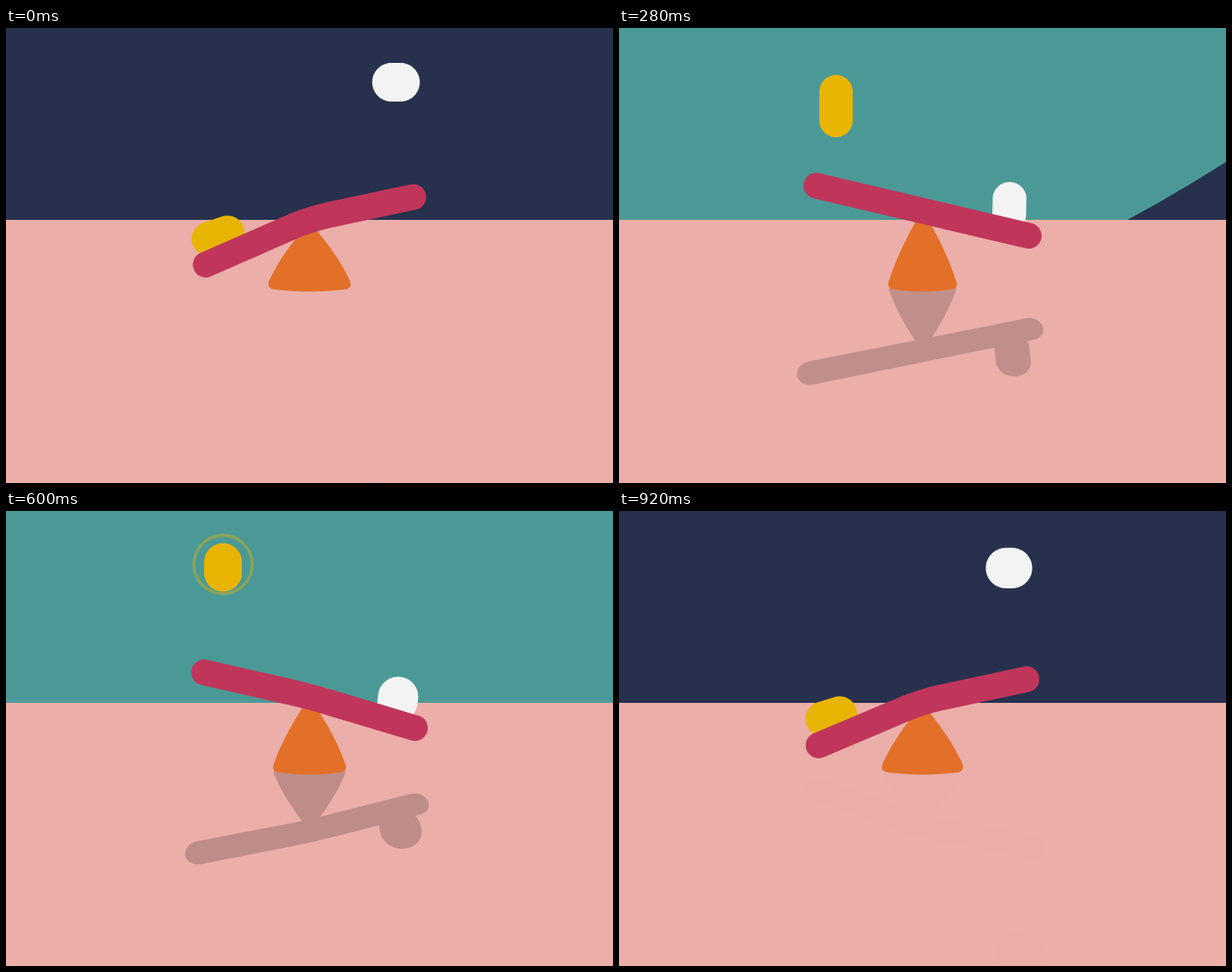
Recreate the animation shown at these times as an HTML page with a canvas. Size 800 by 600 pixels, loop 960 ms.

```html
<!DOCTYPE html>
<html lang="en">
<head>
<meta charset="utf-8">
<title>Seesaw</title>
<style>
  html, body { margin: 0; width: 100%; height: 100%; overflow: hidden; background: #ebaea9; }
  canvas { display: block; width: 800px; height: 600px; }
</style>
</head>
<body>
<canvas id="stage" width="800" height="600"></canvas>
<script>
const ctx = document.getElementById('stage').getContext('2d');
const LOOP = 960, STEP = 40, HORIZON = 253;
const NAVY = '#27314d', TEAL = '#4b9996', YELLOW = '#e8b404', WHITE = '#f3f3f3';
const PINK = [235, 174, 169];

const clamp = (v, lo = 0, hi = 1) => Math.min(hi, Math.max(lo, v));
const mix = (a, b, k) => a + (b - a) * k;
const mixAll = (a, b, k) => a.map((v, i) => mix(v, b[i], k));
const rad = deg => deg * Math.PI / 180;
const quadInOut = x => x < 0.5 ? 2 * x * x : 1 - 2 * (1 - x) ** 2;
const rgb = c => `rgb(${c.map(Math.round).join()})`;

function fillShape(points, color) {
  ctx.fillStyle = color;
  ctx.beginPath();
  points.forEach(([x, y]) => ctx.lineTo(x, y));
  ctx.fill();
}

// Points of a quadratic curve
function curve(a, c, b, n = 16) {
  return Array.from({ length: n + 1 }, (_, i) => mixAll(mixAll(a, c, i / n), mixAll(c, b, i / n), i / n));
}

// Rounded box with fully round short sides, turned about its centre
function pill([cx, cy, w, h, deg]) {
  const r = Math.min(w, h) / 2, cos = Math.cos(rad(deg)), sin = Math.sin(rad(deg)), n = 96;
  return Array.from({ length: n }, (_, i) => {
    const a = (i + 0.5) / n * 2 * Math.PI;
    const x = Math.sign(Math.cos(a)) * (w / 2 - r) + r * Math.cos(a);
    const y = Math.sign(Math.sin(a)) * (h / 2 - r) + r * Math.sin(a);
    return [cx + x * cos - y * sin, cy + x * sin + y * cos];
  });
}

// Thick line with round ends
function thickLine(line, r) {
  const heading = i => {
    const a = line[Math.max(0, i - 1)], b = line[Math.min(line.length - 1, i + 1)];
    return Math.atan2(b[1] - a[1], b[0] - a[0]);
  };
  const at = ([x, y], a) => [x + r * Math.cos(a), y + r * Math.sin(a)];
  const cap = (p, from) => Array.from({ length: 21 }, (_, i) => at(p, from + Math.PI * i / 20));
  const last = line.length - 1;
  const upper = line.map((p, i) => at(p, heading(i) - Math.PI / 2));
  const lower = line.map((p, i) => at(p, heading(i) + Math.PI / 2)).reverse();
  return [...upper, ...cap(line[last], heading(last) - Math.PI / 2),
          ...lower, ...cap(line[0], heading(0) + Math.PI / 2)];
}

function plank(tilt, side, squash) {
  const angle = rad(13.27) * tilt;
  const pivot = [400, 241 + 11 * squash];
  const end = dir => {
    const low = dir === side;
    return [400 + dir * (143.8 * Math.cos(angle) - 3.2 * squash),
            241 + dir * 143.8 * Math.sin(angle) + (low ? 38 : 15) * squash];
  };
  const a = end(-1), b = end(1);
  return thickLine([a, ...curve(mixAll(pivot, a, 0.2), pivot, mixAll(pivot, b, 0.2)), b], 17);
}

function stand(squash) {
  const hw = 46 + 9 * squash;
  const half = dir => {
    const p = (x, y) => [400 + dir * x, y];
    return [
      ...curve(p(7, 252 + 12 * squash), p(32 + 7 * squash, 295 + 7 * squash), p(hw - 2, 333)),
      ...curve(p(hw - 2, 333), p(hw + 2, 342), p(hw - 7, 344.5)),
      ...curve(p(hw - 7, 344.5), p((hw - 7) / 2, 347.5), p(0, 347.5))
    ];
  };
  return [...half(-1), ...half(1).reverse()];
}

// Mirror onto the floor, seen in perspective
function cast(points) {
  return points.map(([x, y]) => {
    const depth = 1 - 0.00055 * (300 - y);
    return [400 + (x - 400) / depth, 375 + 0.824 * (300 - y) / depth];
  });
}

const mirror = ([x, y, w, h, deg]) => [800 - x, y, w, h, -deg];

// Poses are [x, y, width, height, degrees] on the left half of the stage
function seatedPose(squash, hold) {
  const pose = mixAll([285.5, 236, 44.5, 66, -1.4], [279.5, 274, 71, 45, -18.5], squash);
  return mixAll([286, 172, 44, 80, 0], pose, hold);
}

function flyingPose(u, squash, hold) {
  const x = clamp(u, -200, 200) / 40;
  const y = 71.5 - 2.674 * x + 1.1315 * x ** 2 + 0.049 * x ** 3 - 0.00646 * x ** 4;
  const h = 51 + (u < 0 ? 31 : 19) * (1 - squash);
  return mixAll([286, 172, 44, 80, 0], [286, y, 44 + 18.75 * squash, h, 0], hold);
}

// The next sky swings in as a huge disc turning about the pivot
function drawSky(t) {
  const turn = Math.floor(t / 480);
  const [from, to] = turn ? [TEAL, NAVY] : [NAVY, TEAL];
  const k = clamp((t % 480 - 200) / 80, -0.184, 1.16);
  const angle = rad(mix(-65.4, 68.4, k)), R = 2100;
  const offset = mix(-12.6, 114.5, k) - R;
  ctx.save();
  ctx.beginPath();
  ctx.rect(0, 0, 800, HORIZON);
  ctx.clip();
  ctx.fillStyle = from;
  ctx.fillRect(0, 0, 800, HORIZON);
  ctx.fillStyle = to;
  ctx.beginPath();
  ctx.arc(400 + Math.cos(angle) * offset, HORIZON + Math.sin(angle) * offset, R, 0, 2 * Math.PI);
  ctx.fill();
  ctx.restore();
}

function drawRing(t) {
  const k = (t - 520) / 170;
  if (k <= 0 || k >= 1) return;
  ctx.globalAlpha = 0.1 + 0.6 * (1 - k);
  ctx.strokeStyle = YELLOW;
  ctx.lineWidth = 0.6 + 6 * (1 - k);
  ctx.beginPath();
  ctx.arc(286, 70.5, 53.5 * (1 - (1 - k) ** 2), 0, 2 * Math.PI);
  ctx.stroke();
  ctx.globalAlpha = 1;
}

function draw(t) {
  const u = (t + 240) % 480 - 240;
  const side = t >= 240 && t < 720 ? 1 : -1;
  const squash = quadInOut(clamp(1 - Math.abs(u) / 200));
  const hold = clamp((240 - Math.abs(u)) / 40);

  const seated = seatedPose(squash, hold), flying = flyingPose(u, squash, hold);
  const yellow = pill(side < 0 ? seated : flying);
  const white = pill(mirror(side < 0 ? flying : seated));
  const board = plank(side * hold, side, squash), base = stand(squash);

  ctx.fillStyle = rgb(PINK);
  ctx.fillRect(0, 0, 800, 600);
  drawSky(t);

  const shade = 0.108 + side * (0.071 * hold + 0.037 * squash);
  const shadow = rgb(PINK.map(c => c * (1 - clamp(shade))));
  [base, board, white].forEach(shape => fillShape(cast(shape), shadow));

  drawRing(t);
  fillShape(yellow, YELLOW);
  fillShape(white, WHITE);
  fillShape(base, '#e37028');
  fillShape(board, '#c0365a');
}

function tick() {
  // The motion is held on steps; the small lead absorbs timer jitter
  draw(Math.floor((performance.now() + 4) / STEP) * STEP % LOOP);
  requestAnimationFrame(tick);
}
tick();
</script>
</body>
</html>
```
